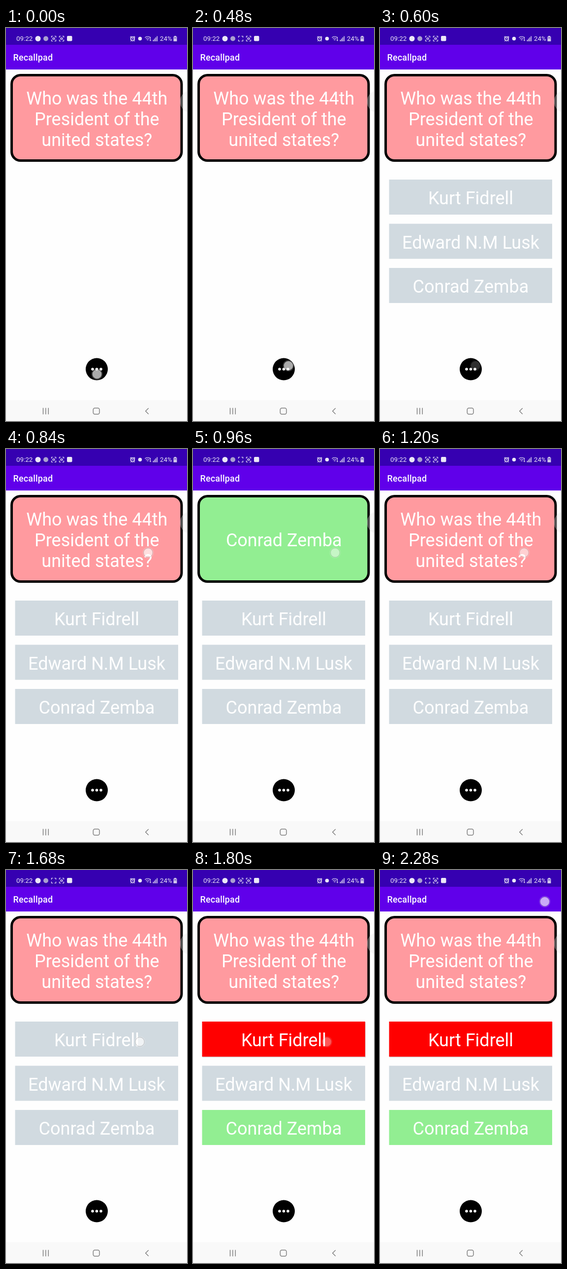
Write an HTML page that moves like this. It is 368 px wide and 796 px high and loops after 2400 ms.

```html
<!DOCTYPE html>
<html lang="en">
<head>
<meta charset="utf-8">
<title>Quiz card</title>
<style>
  html, body { margin: 0; width: 100%; height: 100%; overflow: hidden; background: #fefefe; }
  svg { display: block; width: 100%; height: 100%; font-family: Roboto, "Liberation Sans", sans-serif; }
  .big { font-size: 36px; fill: #fff; text-anchor: middle; }
  .status { font-size: 13.3px; fill: #ece8f7; }
  .icon { fill: none; stroke: #ece8f7; stroke-width: 1.2; }
  .solid { fill: #ece8f7; }
  .nav { fill: none; stroke: #808080; stroke-width: 1.5; }
</style>
</head>
<body>
<svg viewBox="0 0 368 796">
  <rect width="368" height="796" fill="#fefefe"/>
  <rect width="368" height="84" fill="#6000ea"/>
  <rect width="368" height="34" fill="#3600b1"/>

  <text class="status" x="21" y="26">09:22</text>
  <circle class="solid" cx="65" cy="21.5" r="5.5"/>
  <circle cx="81" cy="21.5" r="5" fill="#aaa0d0"/>
  <g class="icon">
    <path id="corners" d="M92.5 19.5v-3h3M98.500 16.500h3v3M101.500 23.500v3h-3M95.500 26.500h-3v-3"/>
    <use href="#corners" x="16"/>
  </g>
  <rect id="blink" class="icon" x="95.200" y="20" width="3.600" height="3"/>
  <rect class="icon" x="111.200" y="20" width="3.600" height="3"/>
  <rect class="solid" x="124" y="16" width="10.500" height="10.500" rx="2"/>

  <g class="icon">
    <circle cx="257.500" cy="22" r="3.800" stroke-width="1.800"/>
    <path d="M252.500 19l2.500-2.200M262.500 19l-2.500-2.200M254.500 25.500l-1 1.500M260.500 25.500l1 1.500M257.500 20v2.300h1.700"/>
    <path d="M282.500 19.500q5.500-4.500 11 0M284.500 22q3.500-3 7 0M286.500 24.300q1.500-1.300 3 0"/>
    <path d="M293.500 18v8M292 24.500l1.500 1.700 1.500-1.700" stroke-width="1"/>
    <path d="M299.500 24v3M302 21.500v5.500M304.500 19v8M307.300 16.500v10.500" stroke-width="1.400"/>
  </g>
  <circle class="solid" cx="272.500" cy="21.500" r="3.800"/>
  <text class="status" x="313" y="26">24%</text>
  <path class="solid" d="M342 16h4v1.500h1.500v9.500h-7v-9.500h1.500z" opacity=".85"/>
  <path d="M341.500 18.500h5v3h-5z" fill="#8d79cc"/>

  <text x="14.500" y="66" font-size="17.900" font-weight="500" letter-spacing=".22" fill="#fff">Recallpad</text>

  <rect id="card" x="11.500" y="95.500" width="345.500" height="173" rx="18" stroke="#000" stroke-width="5"/>
  <g id="question" class="big">
    <text x="184.800" y="154.500">Who was the 44th</text>
    <text x="184.800" y="196.500">President of the</text>
    <text x="184.800" y="238.500">united states?</text>
  </g>
  <text id="answer" class="big" x="184.800" y="196.500"></text>
  <circle cx="376" cy="149" r="22.500" fill="#e4e4e4" opacity=".35"/>

  <g id="choices"></g>

  <circle cx="184.500" cy="691" r="22.500"/>
  <g fill="#fff">
    <circle cx="176" cy="691" r="2.800"/>
    <circle cx="184.500" cy="691" r="2.800"/>
    <circle cx="193" cy="691" r="2.800"/>
  </g>

  <rect y="754" width="368" height="42" fill="#f9f9f9"/>
  <g class="nav">
    <path d="M75.500 769.500v13M80.800 769.500v13M86.200 769.500v13"/>
    <rect x="177.300" y="769.800" width="12.700" height="12.400" rx="3.500"/>
    <path d="M289.800 770l-6 6 6 6"/>
  </g>

  <g id="touch">
    <circle r="11.500" fill="#fff" opacity=".18"/>
    <circle r="9.300" fill="#fff" fill-opacity=".6" stroke="#888" stroke-opacity=".45"/>
  </g>
</svg>
<script>
const STEP = 120, STEPS = 20;
const PINK = '#ff9a9f', GREEN = '#92ee92', RED = '#ff0000', GREY = '#d1dae0';
const names = ['Kurt Fidrell', 'Edward N.M Lusk', 'Conrad Zemba'];
const correct = 2;

// Each tap: position and its opacity per step from the first one on.
const taps = [
  { from: 0, x: 185, y: 701, fade: [1, .3] },
  { from: 4, x: 194, y: 684, fade: [1, .28] },
  { from: 7, x: 289, y: 210, fade: [1, .72] },
  { from: 9, x: 293, y: 210, fade: [1, .8] },
  { from: 14, x: 272, y: 348, fade: [1, .5] },
  { from: 18, x: 335, y: 64, fade: [1, 1] }
];

const $ = id => document.getElementById(id);
const show = (id, on) => $(id).setAttribute('visibility', on ? 'visible' : 'hidden');

function add(parent, tag, attrs, text = '') {
  const node = document.createElementNS('http://www.w3.org/2000/svg', tag);
  for (const key in attrs) node.setAttribute(key, attrs[key]);
  node.textContent = text;
  return parent.appendChild(node);
}

const shadow = add($('choices'), 'rect', { x: 19, y: 308, width: 332, height: 71.5, fill: '#d8c8c8' });
const boxes = names.map((name, i) => {
  const y = 307 + i * 89.5;
  const box = add($('choices'), 'rect', { x: 18.5, y, width: 331.5, height: 71 });
  add($('choices'), 'text', { class: 'big', x: 184.5, y: y + 50 }, name);
  return box;
});
$('answer').textContent = names[correct];

function draw(time) {
  const step = Math.floor(time / STEP) % STEPS;
  const flipped = step >= 8 && step < 10;
  const marked = step >= 15;

  $('card').setAttribute('fill', flipped ? GREEN : PINK);
  show('question', !flipped);
  show('answer', flipped);
  show('choices', step >= 5);
  show('blink', step % 5 < 3);

  boxes.forEach((box, i) => {
    const color = i === 0 ? RED : i === correct ? GREEN : GREY;
    box.setAttribute('fill', marked ? color : GREY);
  });
  shadow.setAttribute('opacity', marked ? 1 : 0);

  const tap = taps.findLast(t => step >= t.from);
  $('touch').setAttribute('transform', `translate(${tap.x} ${tap.y})`);
  $('touch').setAttribute('opacity', tap.fade[step - tap.from] || 0);
}

const start = performance.now();
function tick() {
  draw(performance.now() - start);
  requestAnimationFrame(tick);
}
tick();
</script>
</body>
</html>
```
